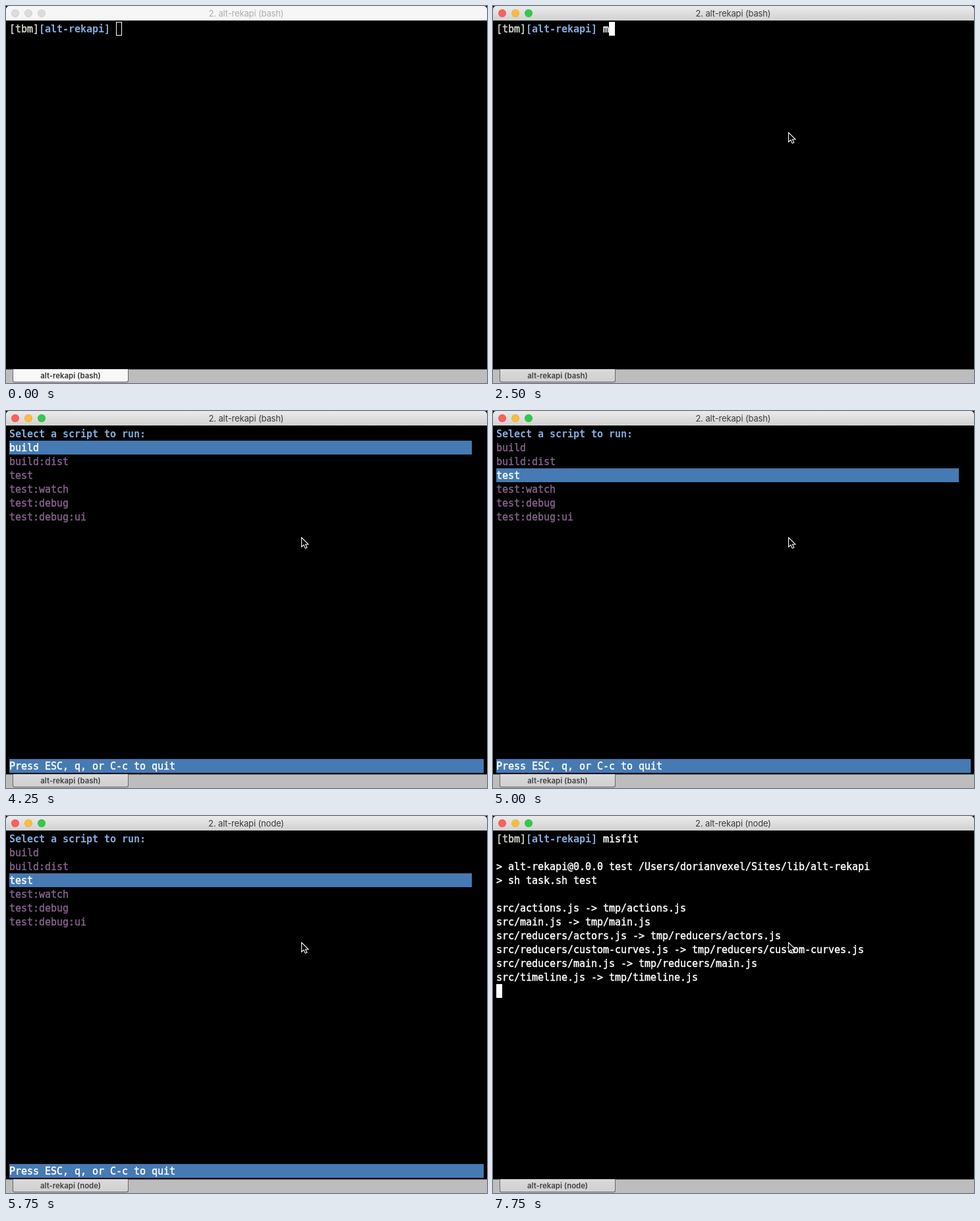
These frames come from a looping animation (730 px wide and 572 px high, 8 s). An HTML page:

```html
<!DOCTYPE html>
<html lang="en">
<head>
<meta charset="utf-8">
<title>Terminal</title>
<style>
html, body { margin: 0; width: 100%; height: 100%; overflow: hidden; background: #000; }
#win { position: absolute; left: 0; top: 0; width: 730px; height: 572px; overflow: hidden; }
#win * { box-sizing: border-box; }
#bar {
  position: absolute; width: 730px; height: 22px; border-radius: 5px 5px 0 0;
  background: linear-gradient(#ebebeb, #d1d1d1);
  font: 13px/22px Inter, "Open Sans", sans-serif; letter-spacing: -.15px;
  color: #3c3c3c; text-align: center;
}
#bar i { position: absolute; top: 5px; width: 12px; height: 12px; border-radius: 50%; border: 1px solid #0001; }
#bar i:nth-child(1) { left: 8px; background: #fc605c; }
#bar i:nth-child(2) { left: 28px; background: #fdbc40; }
#bar i:nth-child(3) { left: 48px; background: #34c84a; }
#title { position: absolute; left: 0; width: 729px; }
#tabs { position: absolute; top: 551px; width: 730px; height: 21px; background: #bdbdbd; border-top: 1px solid #7a7a7a; }
#tab {
  position: absolute; left: 10px; top: -1px; width: 176px; height: 20px;
  border: 1px solid #666; border-top: 0; border-radius: 0 0 3px 3px;
  background: linear-gradient(#dadada, #d0d0d0);
  font: 600 11.4px/20px Inter, "Open Sans", sans-serif; color: #404040; text-align: center;
}
.idle #bar { background: #f6f6f6; color: #acacac; }
.idle #bar i { background: #dcdcdc; border: 1px solid #cfcfcf; }
.idle #tab { background: #f8f8f8; color: #333; }
#term { font: 15px/23px "DejaVu Sans Mono", "Noto Sans Mono", monospace; letter-spacing: -.031px; color: #fff; -webkit-text-stroke: .45px; }
#term div { position: absolute; left: 5px; height: 21px; white-space: pre; }
#term b { color: #84abdb; -webkit-text-stroke: 0; }
#term u { color: #d8dad0; text-decoration: none; }
#term .item { color: #85638b; }
#term .on { background: #467ab3; color: #fff; width: 702px; }
#term .foot { background: #467ab3; width: 720px; }
#term .cur { width: 9px; background: #fff; }
.idle #term .cur { background: none; border: 1px solid #fff; }
#mouse { position: absolute; left: 0; top: 0; }
</style>
</head>
<body>
<div id="win">
  <div id="bar"><i></i><i></i><i></i><span id="title"></span></div>
  <div id="term"></div>
  <div id="tabs"><div id="tab"></div></div>
  <svg id="mouse" width="13" height="19">
    <path d="M.6 1V15.2L3.9 12.1 6.2 17.4 8.8 16.3 6.5 11.2H10.9Z" fill="#000" stroke="#fff" stroke-width="1.1"/>
  </svg>
</div>
<script>
const $ = id => document.getElementById(id);
const LOOP = 8000;
const PROMPT = '<u>[tbm]</u><b>[alt-rekapi]</b> ';
const PROMPT_LEN = 18;
const CMD = 'misfit';
const SCRIPTS = ['build', 'build:dist', 'test', 'test:watch', 'test:debug', 'test:debug:ui'];
const HEAD = ['', '&gt; alt-rekapi@0.0.0 test /Users/dorianvexel/Sites/lib/alt-rekapi', '&gt; sh task.sh test', ''];
const FILES = ['actions', 'main', 'reducers/actors', 'reducers/custom-curves', 'reducers/main', 'timeline']
  .map(f => `src/${f}.js -&gt; tmp/${f}.js`);

const row = (n, html, cls = '', col = 0) =>
  `<div class="${cls}" style="top:${24 + 21 * n}px;left:${5 + 9 * col}px">${html}</div>`;
const cursor = (n, col = 0) => row(n, '', 'cur', col);

const typed = n => row(0, PROMPT + CMD.slice(0, n)) + cursor(0, PROMPT_LEN + n);
const output = lines =>
  [PROMPT + CMD, ...lines].map((s, i) => row(i, s)).join('') + cursor(lines.length + 1);
const menu = pick =>
  row(0, '<b>Select a script to run:</b>') +
  SCRIPTS.map((s, i) => row(i + 1, s, i === pick ? 'on' : 'item')).join('') +
  row(24, 'Press ESC, q, or C-c to quit', 'foot');

// [start in ms, terminal contents]
const steps = [
  [0, typed(0)],
  [2500, typed(1)],
  [2750, typed(2)],
  [3000, typed(4)],
  [3500, typed(6)],
  [4000, output([])],
  [4250, menu(0)],
  [5000, menu(2)],
  [5250, menu(3)],
  [5750, menu(2)],
  [6000, output([])],
  [6500, output(HEAD)],
  [7500, output([...HEAD, ...FILES.slice(0, 2)])],
  [7750, output([...HEAD, ...FILES])],
];

let shown;
function draw(t) {
  const html = steps.findLast(s => s[0] <= t)[1];
  if (html !== shown) $('term').innerHTML = shown = html;
  const name = `alt-rekapi (${t < 5750 ? 'bash' : 'node'})`;
  $('title').textContent = '2. ' + name;
  $('tab').textContent = name;
  $('win').className = t < 1000 ? 'idle' : '';
  $('mouse').style.visibility = t < 500 ? 'hidden' : 'visible';
  $('mouse').style.transform = t < 750 ? 'translate(550px,177px)' : 'translate(448px,191px)';
}

const start = performance.now();
function tick() {
  draw((performance.now() - start) % LOOP);
  requestAnimationFrame(tick);
}
tick();
</script>
</body>
</html>
```
